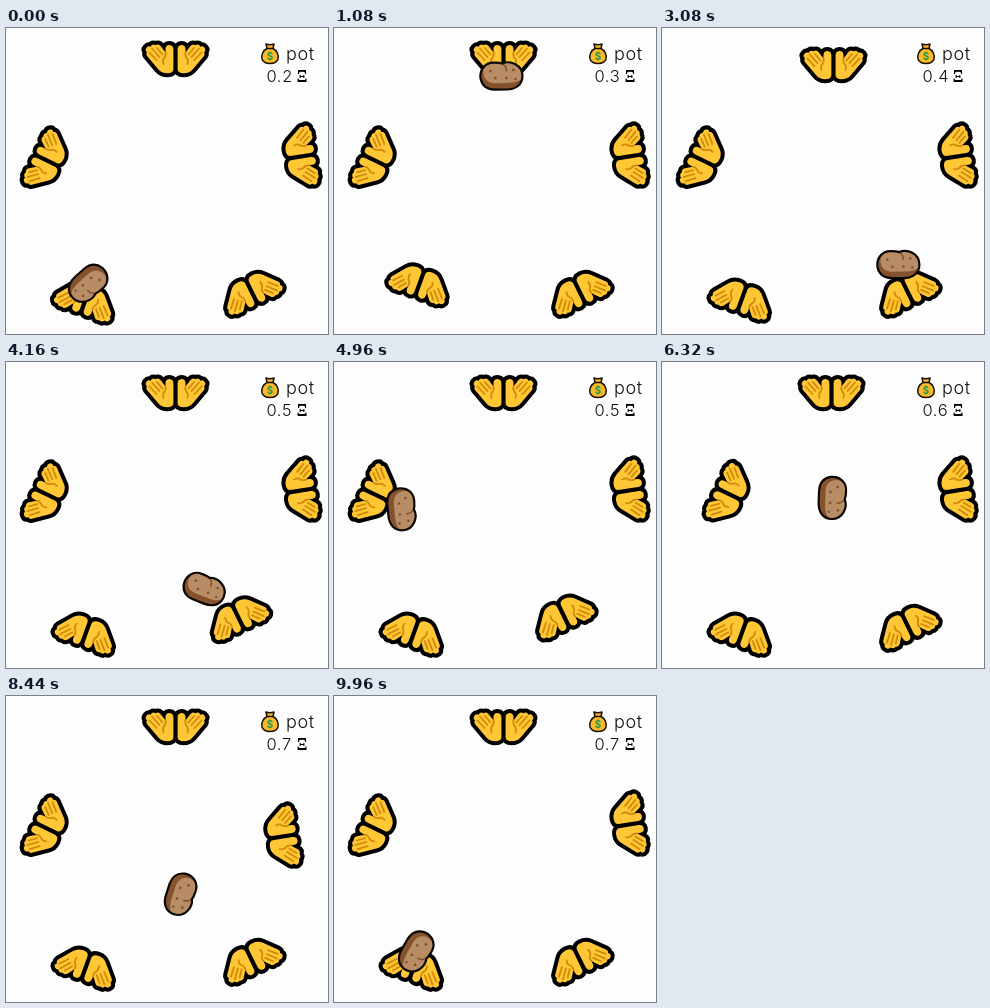
These frames come from a looping animation (322 by 306 pixels, 9.98 s). An HTML page:

```html
<!DOCTYPE html>
<html lang="en">
<head>
<meta charset="utf-8">
<title>Hot potato</title>
<style>
  html, body { margin: 0; width: 100%; height: 100%; overflow: hidden; background: #fdfdfd; }
  svg { display: block; width: 322px; height: 306px; }
  text { font-family: Inter, "Open Sans", sans-serif; font-weight: 300; letter-spacing: .6px; fill: #111; }
  .line { fill: none; stroke-linecap: round; stroke-linejoin: round; }
</style>
</head>
<body>
<svg viewBox="0 0 322 306">
  <defs>
    <path id="palm" d="M-2.1 10.5Q-2.6 14.300-8 14.300Q-14 14.300-17.500 10L-28.500-3Q-30-5-28.500-6.800Q-31-9-29-11.300Q-27.500-13.300-25-12.300Q-23-15.500-20-13.800Q-16.800-15.500-14.800-12.800L-10-6.500V-10Q-9.800-14-6-14Q-2.100-13.700-2.100-9.500Z"/>
    <g id="hand">
      <use href="#palm" fill="#ffc636"/>
      <path d="M-26-6.500-19 1M-23.500-10.500-16-2M-18.500-11-13-4.500M-10-6.500Q-9-3-12 0Q-13 2-12 5" stroke="#d18a08" stroke-width="1.800"/>
    </g>
    <g id="pair" class="line">
      <g stroke="#000" stroke-width="8"><use href="#palm"/><use href="#palm" transform="scale(-1 1)"/></g>
      <use href="#hand"/><use href="#hand" transform="scale(-1 1)"/>
    </g>
    <path id="skin" d="M-21 2C-22-8-15-14-7-13.500Q-2-13.500 1-12.500C9-16 21-11 21 0C21 9 14 13.500 5 13.500H-7Q-19 13-21 2Z"/>
    <clipPath id="inside"><use href="#skin"/></clipPath>
  </defs>

  <g id="hands"></g>

  <g id="potato">
    <use href="#skin" fill="#84522d"/>
    <path d="M-18-3C-18-10-13-14-7-14Q-2-13 1-13C12-16 22-10 21 1C20 5 14 7 6 7H-8Q-17 6-18-3Z" fill="#b88d66" clip-path="url(#inside)"/>
    <path d="M1-12Q5-10 5-5" class="line" stroke="#80502f" stroke-width="1.500"/>
    <g fill="#7d5030">
      <circle cx="-11" cy="-5" r="1.300"/><circle cx="-6" cy="2" r="1.300"/>
      <circle cx="5" cy="2" r="1.300"/><circle cx="12" cy="-6" r="1.300"/>
      <circle cx="14" cy="3" r="1.200"/>
    </g>
    <use href="#skin" class="line" stroke="#0b0704" stroke-width="2.200"/>
  </g>

  <g stroke="#151005" stroke-width="1.500" stroke-linejoin="round">
    <path d="M260 16Q264 17.500 268 16L267 20.500C271 22.500 273 27 272 31Q270.500 35.500 264 35.500T256 31C255 27 257 22.500 261 20.500Z" fill="#fdb92a"/>
    <path d="M261 20.500H267" fill="none"/>
  </g>
  <text x="264" y="32" text-anchor="middle" style="font-size:10px;font-weight:600;letter-spacing:0;fill:#1a9a4a">$</text>
  <text x="280" y="32" font-size="18">pot</text>
  <text id="sum" x="260.500" y="54" font-size="16.500">0.2</text>
  <text x="291" y="54" style="font:700 16px 'Noto Serif',serif;letter-spacing:0;fill:#000">Ξ</text>
</svg>
<script>
const LOOP = 9980, FLIGHT = 1500, REACH = 850, WINDUP = 2;

// In throwing order: hand centre, turn, potato rest point, launch time,
// reach of the throw, potato turn when leaving and when caught by the next.
const seats = [
  { x: 80, y: 270.5, turn: 200, hold: [82, 255.5], at: 0, reach: 30, spin: [138, -8] },
  { x: 169.5, y: 31, turn: 0, hold: [172, 37], at: 2095, reach: 8, spin: [-8, 0] },
  { x: 245.5, y: 263.5, turn: 154, hold: [242, 254], at: 3900, reach: 32, spin: [0, 90] },
  { x: 41, y: 132.5, turn: -64, hold: [57, 141], at: 5880, reach: 32, spin: [90, 94] },
  { x: 295, y: 128.5, turn: 81, hold: [283, 131], at: 7970, reach: 26, spin: [94, 120] }
];

const layer = document.getElementById('hands');
const potato = document.getElementById('potato');
const sum = document.getElementById('sum');

for (const s of seats) {
  s.el = document.createElementNS('http://www.w3.org/2000/svg', 'use');
  s.el.setAttribute('href', '#pair');
  layer.append(s.el);
}

const mix = (a, b, k) => a + (b - a) * k;
const next = i => seats[(i + 1) % seats.length];

// cubic-bezier(.25, .1, .25, 1)
function ease(x) {
  if (x <= 0) return 0;
  if (x >= 1) return 1;
  const curve = (a, b, u) => 3 * a * u * (1 - u) ** 2 + 3 * b * u * u * (1 - u) + u ** 3;
  let lo = 0, hi = 1;
  for (let n = 0; n < 24; n++) {
    const mid = (lo + hi) / 2;
    if (curve(.25, .25, mid) < x) lo = mid; else hi = mid;
  }
  return curve(.1, 1, lo);
}

function push(s, age) {
  if (age < 0) return 0;
  return age < REACH
    ? mix(-WINDUP, s.reach, ease(age / REACH))
    : s.reach * (1 - ease((age - REACH) / REACH));
}

function place(el, x, y, turn) {
  el.setAttribute('transform', `translate(${x.toFixed(2)} ${y.toFixed(2)}) rotate(${turn.toFixed(2)})`);
}

function draw(t) {
  let now = 0;
  seats.forEach((s, i) => {
    if (t >= s.at) now = i;
    const to = next(i), dx = to.x - s.x, dy = to.y - s.y;
    const d = push(s, t - s.at) / Math.hypot(dx, dy);
    place(s.el, s.x + dx * d, s.y + dy * d, s.turn);
  });

  const from = seats[now], to = next(now);
  const k = ease((t - from.at) / FLIGHT);
  place(potato, mix(from.hold[0], to.hold[0], k), mix(from.hold[1], to.hold[1], k), mix(...from.spin, k));

  const paid = seats.filter(s => t >= s.at + 60).length;
  sum.textContent = ((2 + paid) / 10).toFixed(1);
}

const start = performance.now();
function tick() {
  draw((performance.now() - start) % LOOP);
  requestAnimationFrame(tick);
}
tick();
</script>
</body>
</html>
```
